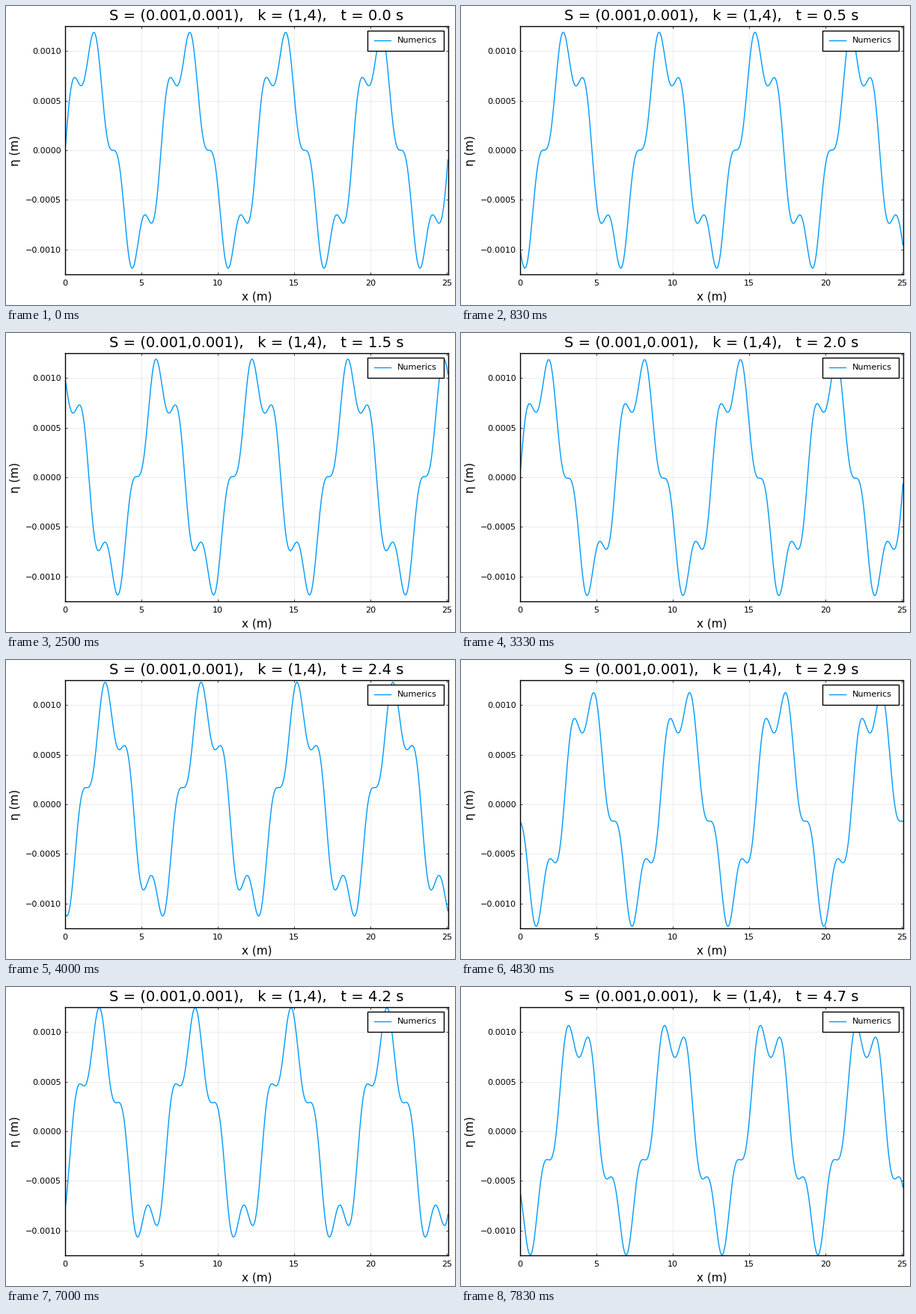
A matplotlib script that plays this animation: 600 by 400 pixels, repeating every 8 s.

```python
import numpy as np
import matplotlib.pyplot as plt
from matplotlib.animation import FuncAnimation

W, H, DPI = 600, 400, 100
LOOP_MS, TICK_MS = 8000, 25
STEPS_PER_SECOND, DT = 6, 0.1
GRAVITY = 9.81
STEEPNESS = 0.001
WAVENUMBERS = (1, 4)
POINTS = 512

plt.rcParams["font.family"] = "DejaVu Sans"

x = np.arange(POINTS) * 8 * np.pi / POINTS


def surface(t):
    """Sum of linear deep-water waves travelling to the right."""
    return sum(STEEPNESS / k * np.sin(k * x - np.sqrt(GRAVITY * k) * t)
               for k in WAVENUMBERS)


def heading(t):
    return f"S = (0.001,0.001),   k = (1,4),   t = {t:.1f} s"


fig = plt.figure(figsize=(W / DPI, H / DPI), dpi=DPI, facecolor="white")
left, right, top, bottom = 79, 590.55, 27, 359
ax = fig.add_axes([left / W, 1 - bottom / H, (right - left) / W, (bottom - top) / H])

y_max = sum(STEEPNESS / k for k in WAVENUMBERS)
ax.set_xlim(0, x[-1])
ax.set_ylim(-y_max, y_max)
ax.set_xticks(range(0, 26, 5))
ax.set_yticks(np.arange(-2, 3) * 0.0005)
ax.yaxis.set_major_formatter(lambda v, _: f"{v:.4f}".replace("-", "\u2212"))
ax.tick_params(direction="in", length=2, width=0.5, labelsize=8, top=True, right=True)
ax.tick_params(axis="x", pad=4.8)
ax.tick_params(axis="y", pad=3.6)
ax.set_axisbelow(True)
ax.grid(color="black", alpha=0.1, linewidth=0.5)
for spine in ax.spines.values():
    spine.set_linewidth(1)

ax.set_xlabel("x (m)", fontsize=11, labelpad=4.5)
ax.set_ylabel("η (m)", fontsize=11)
title = ax.set_title(heading(0), fontsize=14)
line, = ax.plot(x, surface(0), color="#009afa", linewidth=1, label="Numerics")
legend = ax.legend(loc="upper right", fontsize=8, borderpad=0.8, fancybox=False,
                   framealpha=1, edgecolor="black", facecolor="white")
legend.get_frame().set_linewidth(1)


def update(frame):
    # Hold each step for a sixth of a second, switching on the nearest tick.
    step = int((frame * TICK_MS + 17) * STEPS_PER_SECOND / 1000)
    t = step * DT
    line.set_ydata(surface(t))
    title.set_text(heading(t))
    return line, title


anim = FuncAnimation(fig, update, frames=LOOP_MS // TICK_MS, interval=TICK_MS,
                     repeat=True, repeat_delay=0, blit=False)
plt.show()
```
